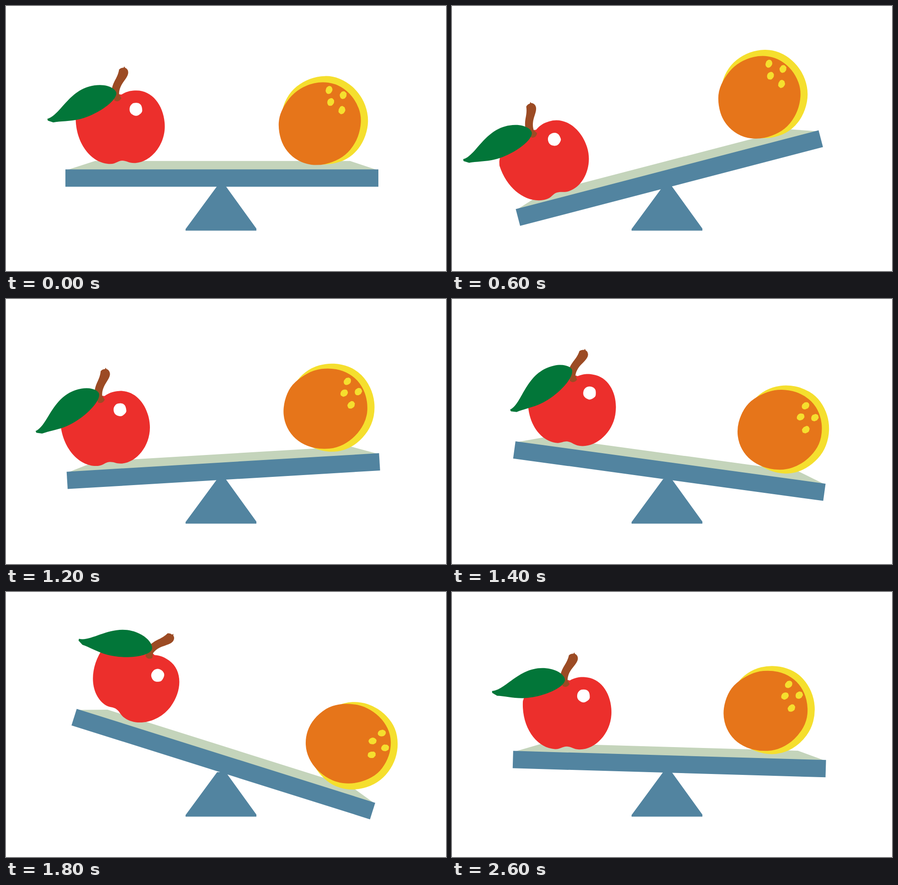
Write an HTML page that moves like this. It is 963 by 581 pixels and loops after 2.7 s.

```html
<!DOCTYPE html>
<html lang="en">
<head>
<meta charset="utf-8">
<title>Seesaw</title>
<style>
  html, body { margin: 0; width: 100%; height: 100%; overflow: hidden; background: #fff; }
  svg { display: block; width: 100vw; height: 100vh; }
  .blue { fill: #5284a0; }
  .red { fill: #ec2f2c; }
  .yellow { fill: #f5df2e; }
</style>
</head>
<body>
<svg viewBox="0 0 963 581">
  <path class="blue" d="M462 395 H481 L548 488 V492.5 H393 V489Z"/>
  <g id="seesaw">
    <path fill="#c4d4bb" d="M-338 -18 L-277.5 -37.5 H280.5 L339 -18Z"/>
    <path class="blue" d="M-342.5 -19 H342.5 V19 H-342.5Z"/>
    <g id="apple">
      <g transform="translate(-250 -265)">
        <path class="red" d="M252 194 C265 186 275 185 285 185 C322 185 347 222 347 264 C347 307 314 344 280 344
          C268 344 264 339 254 339 C244 339 240 346 228 346 C188 346 152 303 152 245 C160 205 215 185 252 194Z"/>
        <g id="shine"></g>
        <path fill="#9c4b24" d="M247 139 Q251 135 257 135 L258 132 L260 135 Q267 138 267 146 C266 160 247 170 247 193
          L252 202 Q246 212 237 207 L231 183 C234 164 244 158 247 139Z"/>
        <path id="leaf" fill="#027639" d="M90 247 C120 240 140 173 205 173 C228 173 241 184 241 191
          C241 210 195 240 160 248 C140 253 118 252 103 255 L91 251Z"/>
      </g>
    </g>
    <g id="orange"></g>
  </g>
</svg>
<script>
const el = id => document.getElementById(id);

let seed = 7;
function random() {
  seed = seed * 16807 % 2147483647;
  return seed / 2147483647;
}

// Slightly uneven ellipse, as if cut out by hand.
function disc(parent, fill, cx, cy, rx, ry, tilt = 0, wobble = 0.6) {
  const count = 18, pts = [];
  for (let i = 0; i < count; i++) {
    const a = i / count * 2 * Math.PI, w = (random() - 0.5) * 2 * wobble;
    pts.push([cx + (rx + w) * Math.cos(a), cy + (ry + w) * Math.sin(a)]);
  }
  const mid = i => pts[i].map((v, k) => (v + pts[(i + 1) % count][k]) / 2);
  const curves = pts.map((p, i) => `Q${p} ${mid(i)}`).join('');
  const path = document.createElementNS('http://www.w3.org/2000/svg', 'path');
  path.setAttribute('d', `M${mid(count - 1)}${curves}Z`);
  path.setAttribute('transform', `rotate(${tilt} ${cx} ${cy})`);
  path.setAttribute('fill', fill);
  el(parent).append(path);
}

disc('shine', '#fff', 284, 226, 14.2, 14.5);
disc('orange', '#f5df2e', 11, -7.5, 96, 98.5, 0, 1);
disc('orange', '#e6751a', 0, 0, 94.5, 88.5, -50, 1);
for (const [x, y] of [[20.5, -74], [51.5, -63], [24.5, -48], [48.5, -30]]) {
  disc('orange', '#f5df2e', x, y, 7.2, 9, 20);
}

// Key values by pose, relative to the board; linear in between.
const tracks = {
  appleSlide:  { 0: -222, 6: -254, 7: -262, 10: -231, 14: -240, 18: -227 },
  appleLift:   { 0: 112, 6: 105, 7: 109, 10: 108, 14: 116, 15: 104, 18: 106 },
  appleRoll:   { 0: 0, 6: -3, 7: -1, 10: 1.5, 14: 18.5, 15: 10, 18: 1.5 },
  leafLag:     { 0: 0, 5: 31, 6: 17, 7: 1, 10: -21.5, 12: -28, 14: -7, 15: 20.5, 18: 9 },
  orangeSlide: { 0: 214, 6: 235, 10: 227, 14: 247, 18: 207 },
  orangeRoll:  { 0: 0, 6: 15, 7: 28, 10: 24, 14: 40, 18: 24 }
};

function value(name, pose) {
  const track = tracks[name], keys = Object.keys(track).map(Number);
  const to = keys.find(k => k >= pose);
  const from = keys.findLast(k => k <= pose);
  return to === from ? track[to]
    : track[from] + (track[to] - track[from]) * (pose - from) / (to - from);
}

const ease = k => (1 - Math.cos(Math.PI * Math.min(k, 1))) / 2;

// Ease down to the left, swing across at a steady rate, ease back to level.
function tilt(pose) {
  if (pose <= 6) return -14.6 * ease(pose / 5);
  if (pose <= 14) return Math.min(17.5, -14.6 + 5.6 * (pose - 6));
  return 17.5 * (1 - ease((pose - 14) / 5));
}

function place(id, x, y, angle) {
  el(id).setAttribute('transform', `translate(${x} ${y}) rotate(${angle})`);
}

function draw(pose) {
  const get = name => value(name, pose);
  const roll = get('orangeRoll');
  place('seesaw', 472.5 + 3.2 * Math.min(pose, 1), 377.3, tilt(pose));
  place('apple', get('appleSlide'), -get('appleLift'), get('appleRoll'));
  place('orange', get('orangeSlide'), -119 - 0.16 * roll, roll);
  el('leaf').setAttribute('transform', `rotate(${get('leafLag')} 218 195)`);
}

// Steps of 100 ms, resting for four extra steps at each end of the swing.
const clamp = (v, lo, hi) => Math.min(hi, Math.max(lo, v));
const start = performance.now();
function tick() {
  const step = Math.floor((performance.now() - start) % 2700 / 100);
  draw(step - clamp(step - 6, 0, 4) - clamp(step - 18, 0, 4));
  requestAnimationFrame(tick);
}
tick();
</script>
</body>
</html>
```
